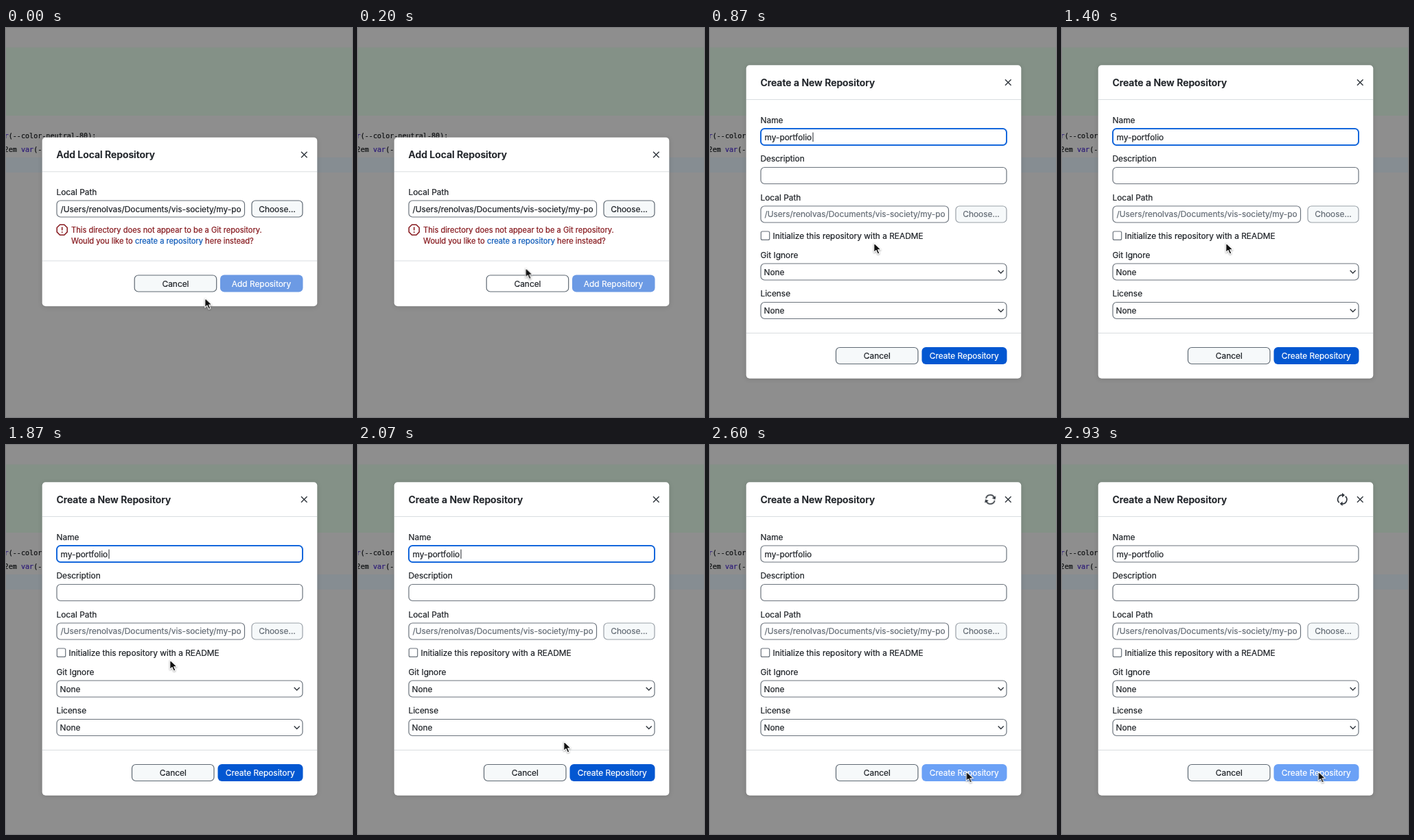
Write an HTML page that moves like this. It is 504 px wide and 568 px high and loops after 3 s.

```html
<!DOCTYPE html>
<html lang="en">
<head>
<meta charset="utf-8">
<title>Add Local Repository</title>
<style>
html, body { margin: 0; width: 100%; height: 100%; overflow: hidden; background: #8e8e8e; }
svg { display: block; width: 504px; height: 568px; }
text { font: 11.9px Inter, "Open Sans", sans-serif; color: #1f2328; white-space: pre; }
text, tspan { fill: currentColor; stroke: currentColor; stroke-width: .22px; }
.title { font-size: 13.95px; font-weight: 600; }
.code { font: 10.1px "DejaVu Sans Mono", monospace; color: #101214; }
.code .fn { color: #2d1b78; }
.error text { font-size: 11.13px; color: #86181d; }
.error .link { color: #0a58b8; }
.mid { text-anchor: middle; }
.path { letter-spacing: -.02px; }
.muted { color: #656d76; }
.light { color: #fff; }
.sheet { fill: #fff; filter: drop-shadow(0 1px 3px rgba(0,0,0,.14)); }
.rule { stroke: #d9dde0; }
.box { fill: #fff; stroke: #6b737c; stroke-width: 1.2; }
.btn { fill: #f6f9fa; stroke: #5f6973; stroke-width: 1.2; }
.off { stroke: #9aa1a8; }
.ring { fill: none; stroke: #1467dc; stroke-width: 2; }
.icon { fill: none; stroke: #30363d; stroke-width: 1.4; }

/* every change is a hard cut on a 3 s loop */
.add, .new, .link, .cancel, .create, .ring, .caret, .sync, .arrow, .hand {
  animation: 3s step-end infinite;
}
.add { animation-name: add; }
.new { animation-name: new; }
.link { animation-name: link; }
.cancel { animation-name: cancel; }
.create { animation-name: create; }
.ring { animation-name: ring; }
.caret { animation-name: caret; }
.sync { animation-name: sync; }
.hand { animation-name: hand; }
.arrow { animation-name: arrow, move; }
.spin { transform-origin: 408.3px 79.5px; animation: spin 1s steps(15) -75ms infinite; }

@keyframes add { 0% { visibility: visible } 28.99%, 100% { visibility: hidden } }
@keyframes new { 0% { visibility: hidden } 28.99%, 100% { visibility: visible } }
@keyframes link { 0% { text-decoration-line: none } 13.33%, 100% { text-decoration-line: underline } }
@keyframes cancel { 0% { fill: #f6f9fa } 4.33% { fill: #fff } 8.99%, 100% { fill: #f6f9fa } }
@keyframes create { 0% { fill: #0357d1 } 82.32%, 100% { fill: #6ba1f6 } }
@keyframes ring { 0% { opacity: 1 } 82.32%, 100% { opacity: 0 } }
@keyframes caret { 0% { opacity: 1 } 46.66% { opacity: 0 } 62.32% { opacity: 1 } 79.99%, 100% { opacity: 0 } }
@keyframes sync { 0% { opacity: 0 } 82.32%, 100% { opacity: 1 } }
@keyframes hand { 0% { opacity: 0 } 22.32% { opacity: 1 } 28.99%, 100% { opacity: 0 } }
@keyframes arrow { 0% { opacity: 1 } 22.32% { opacity: 0 } 28.99%, 100% { opacity: 1 } }
@keyframes spin { to { transform: rotate(360deg) } }
@keyframes move {
  0% { transform: translate(289px, 393.5px) }
  2.33% { transform: translate(279px, 384px) }
  4.33% { transform: translate(260px, 366px) }
  6.66% { transform: translate(243.3px, 349.5px) }
  8.99% { transform: translate(239px, 336px) }
  10.99% { transform: translate(238px, 325px) }
  13.33% { transform: translate(238px, 317px) }
  15.66% { transform: translate(238px, 313px) }
  64.33% { transform: translate(246px, 332px) }
  66.66% { transform: translate(266px, 376px) }
  68.99% { transform: translate(299px, 432px) }
  70.99% { transform: translate(333px, 478px) }
  73.33% { transform: translate(357px, 501px) }
  75.66% { transform: translate(369px, 494px) }
  77.66% { transform: translate(373.3px, 482px) }
  79.99% { transform: translate(373px, 478px) }
  82.32%, 100% { transform: translate(372.5px, 476px) }
}
</style>
</head>
<body>
<svg viewBox="0 0 504 568">
  <defs>
    <clipPath id="field"><rect x="75" y="0" width="267.5" height="568"/></clipPath>
    <path id="close" class="icon" d="M-4.3-4.3 4.3 4.3M4.3-4.3-4.3 4.3"/>
    <path id="chevron" class="icon" d="M-4-2 0 2 4-2"/>
    <rect id="wide" class="box" x="74" width="358" height="24" rx="5.5"/>
    <rect id="short" class="box" x="74" width="273.5" height="24" rx="5.5"/>
    <rect id="choose" x="358" width="74" height="24" rx="5.5"/>
  </defs>

  <rect width="504" height="568" fill="#8e8e8e"/>
  <rect y="28.5" width="504" height="99.5" fill="#849187"/>
  <rect y="189" width="504" height="22" fill="#868d92"/>
  <text class="code" x="-2.4" y="161"><tspan class="fn">r</tspan>(--color-neutral-80);</text>
  <text class="code" x="-2.4" y="181">2em <tspan class="fn">var</tspan>(--color</text>

  <g class="add">
    <rect class="sheet" x="52.7" y="159.7" width="400.6" height="246.6" rx="5"/>
    <text class="title" x="73.5" y="190">Add Local Repository</text>
    <use href="#close" x="434.3" y="185"/>
    <path class="rule" d="M53 209.8H453M53 340H453"/>
    <text x="73.5" y="244">Local Path</text>
    <use href="#short" y="252"/>
    <g clip-path="url(#field)"><text class="path" x="79.5" y="268.5">/Users/renolvas/Documents/vis-society/my-po</text></g>
    <use href="#choose" class="btn" y="252"/>
    <text class="mid" x="395" y="268.5">Choose…</text>
    <g class="error">
      <path d="M78.5 287.2h6.4l4.3 4.3v6.4l-4.3 4.3h-6.4l-4.3-4.3v-6.4zM81.7 290.5v5M81.7 297.2v1.7" fill="none" stroke="#86181d" stroke-width="1.5"/>
      <text x="95" y="298.5">This directory does not appear to be a Git repository.</text>
      <text x="95" y="315">Would you like to <tspan class="link">create a repository</tspan> here instead?</text>
    </g>
    <rect class="btn cancel" x="187.2" y="361" width="119.5" height="24" rx="5.5"/>
    <text class="mid" x="247" y="377.5">Cancel</text>
    <rect x="312" y="360.5" width="120.5" height="25" rx="6" fill="#6c9ae4"/>
    <text class="mid light" x="372" y="377.5">Add Repository</text>
  </g>

  <g class="new">
    <rect class="sheet" x="52.7" y="54.2" width="400.6" height="457.6" rx="5"/>
    <text class="title" x="73.5" y="84.5">Create a New Repository</text>
    <use href="#close" x="434.3" y="79.5"/>
    <path class="rule" d="M53 104.5H453M53 445.5H453"/>

    <text x="73.5" y="138.5">Name</text>
    <use href="#wide" y="147"/>
    <rect class="ring" x="74" y="147" width="358" height="24" rx="5.5"/>
    <text x="79.5" y="163.5">my-portfolio</text>
    <path class="caret" d="M150 152.5V166" stroke="#1f2328"/>

    <text x="73.5" y="195">Description</text>
    <use href="#wide" y="203.5"/>

    <text x="73.5" y="251.5">Local Path</text>
    <use href="#short" y="260"/>
    <g clip-path="url(#field)"><text class="path muted" x="79.5" y="276">/Users/renolvas/Documents/vis-society/my-po</text></g>
    <use href="#choose" class="btn off" y="260"/>
    <text class="mid muted" x="395" y="276">Choose…</text>

    <rect class="box" x="74.3" y="297" width="12.4" height="12.4" rx="2"/>
    <text x="91.5" y="307.5">Initialize this repository with a README</text>

    <text x="73.5" y="335.5">Git Ignore</text>
    <use href="#wide" y="344"/>
    <text x="78.5" y="360.5">None</text>
    <use href="#chevron" x="423.7" y="356"/>

    <text x="73.5" y="392">License</text>
    <use href="#wide" y="400.5"/>
    <text x="78.5" y="417">None</text>
    <use href="#chevron" x="423.7" y="412.5"/>

    <rect class="btn" x="183.5" y="466.5" width="119.5" height="24" rx="5.5"/>
    <text class="mid" x="243.3" y="483">Cancel</text>
    <rect class="create" x="308.5" y="466" width="124" height="25" rx="6"/>
    <text class="mid light" x="370.3" y="483">Create Repository</text>

    <g class="sync"><g class="spin">
      <path class="icon" style="stroke-width:1.7" d="M403.8 84.2A6.4 6.4 0 0 1 408.8 73.1M412.8 74.8A6.4 6.4 0 0 1 407.8 85.9"/>
      <path fill="#30363d" d="M408 70v6.4l4-3.2zM408.6 89v-6.4l-4 3.2z"/>
    </g></g>
  </g>

  <g class="arrow">
    <path d="M.8.8V14.6L4 11.6 6.3 17 8.9 15.9 6.6 10.7H11Z" fill="#111" stroke="#fff" stroke-width="1.1" stroke-linejoin="round" style="filter:drop-shadow(0 1px 1px rgba(0,0,0,.35))"/>
  </g>
  <g class="hand">
    <path transform="translate(233.5 313.2)" d="M4.2 12V3.2a1.6 1.6 0 0 1 3.2 0V8q1.3-1.4 2.6 0 1.5-1 2.5.5 2.3-.7 2.3 1.7 0 4.6-1.8 6.2v2.8H6.3v-2.4L1.7 12.6q-1.3-2 .3-2.4Q3.4 10.2 4.2 12M7.8 13v3.5M9.9 13v3.5M12 13v3.5" fill="#fff" stroke="#111" stroke-width="1.2" stroke-linejoin="round"/>
  </g>
</svg>
</body>
</html>
```
